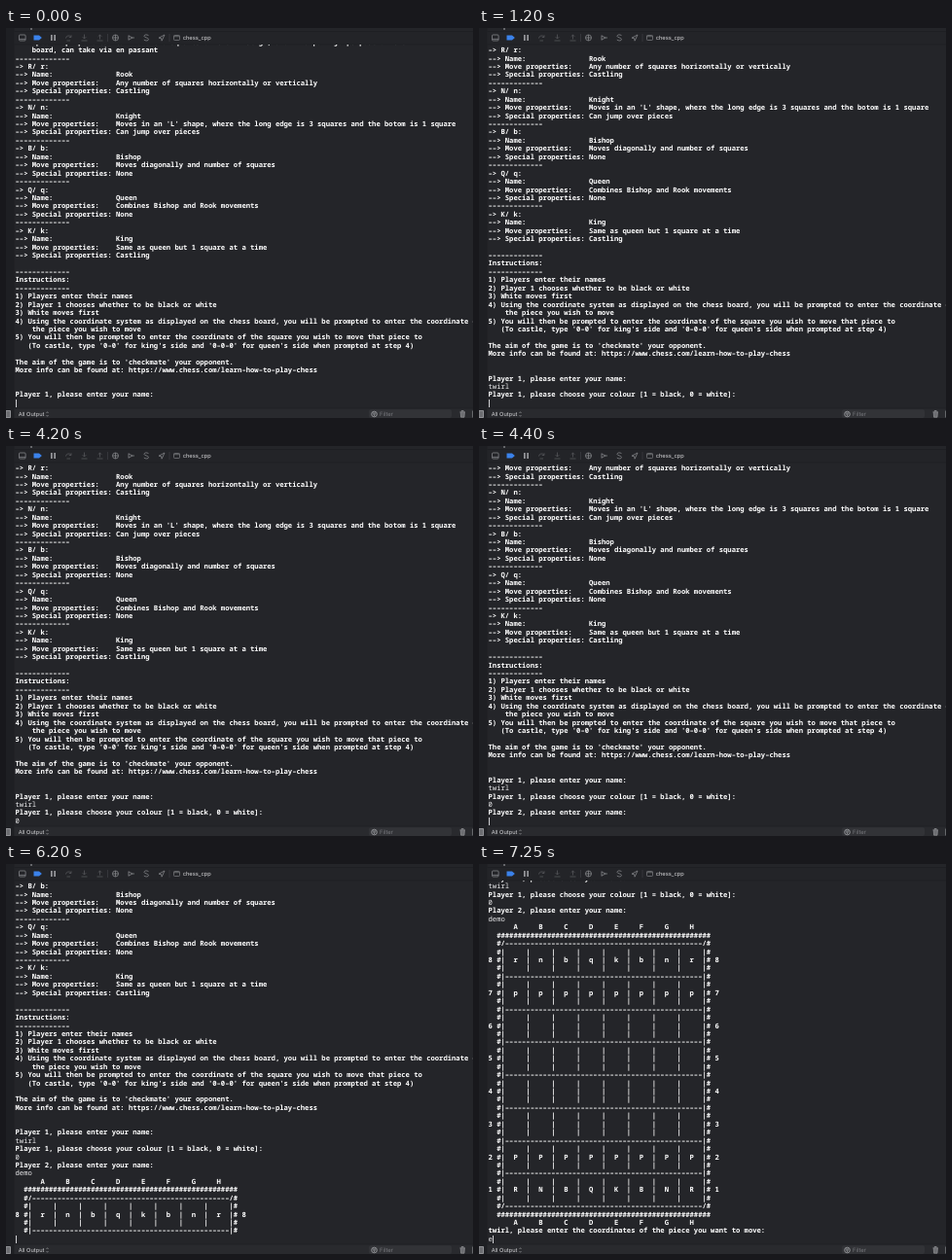
Animation of 480x401 px, one loop 8 s. Source, as an HTML page:

```html
<!DOCTYPE html>
<html lang="en">
<head>
<meta charset="utf-8">
<title>Console chess</title>
<style>
  html, body { margin: 0; width: 100%; height: 100%; overflow: hidden; background: #242529; }
  #stage { position: relative; width: 480px; height: 401px; overflow: hidden; }
  #console { position: absolute; left: 9px; top: 17px; width: 471px; height: 374px; overflow: hidden; }
  #log {
    position: absolute; left: .5px; bottom: .7px; margin: 0; color: #fff;
    font: 800 7.195px/8.44px "Noto Sans Mono", monospace;
    font-variant-ligatures: none; text-rendering: geometricPrecision; white-space: pre;
  }
  #log i { font-style: normal; font-weight: 500; color: #ececee; }
  #caret { position: absolute; bottom: 1px; width: 1px; height: 8.4px; background: #cfcfd2; }
  svg { position: absolute; left: 0; top: 0; }
  svg text { font-family: Inter, sans-serif; text-rendering: geometricPrecision; }
</style>
</head>
<body>
<div id="stage">
  <svg width="480" height="401" fill="none" stroke-width=".8">
    <path fill="#1e1f23" d="M0 0h8.5v401H0z"/>
    <path fill="#232428" d="M8.5 3.5h472V17h-472z"/>
    <path fill="#292a2e" d="M8.5 391h472v10h-472z"/>
    <path stroke="#1e1f22" d="M8.5 3.5h472M8.5 17h472M8.5 391h472"/>
    <path stroke="#77787c" d="M25 0l2 2m0-2l-2 2"/>

    <!-- debug toolbar -->
    <g stroke="#85868a">
      <rect x="13.5" y="7" width="6.6" height="6" rx="1"/>
      <path d="M14 11.4h6"/>
      <circle cx="112.5" cy="10" r="3"/>
      <path d="M112.5 7v6M109.500 10h6"/>
      <path d="M126 7.500v5M126 8l4 2-4 2M129.500 10h2.500"/>
      <path d="M146.500 7.600c-2-1.200-4.500-.8-4.500.8s4.500 1.400 4.500 3.200-3.200 1.700-4.700.5"/>
      <path d="M157 10.200l6-3.200-2.900 6.200-.5-2.600z"/>
    </g>
    <path fill="#3b82ea" d="M28.500 7.400h5.500l2.900 2.600-2.900 2.600h-5.500z"/>
    <path fill="#97989c" d="M46 7h1.700v6H46zM49.300 7h1.700v6h-1.700z"/>
    <g stroke="#55565a">
      <path d="M61.500 10.500a3 3 0 0 1 5.500-1.200m0-2v2.200h-2.200M62.500 13h3.500"/>
      <path d="M80.500 6.500v4.500m-1.800-1.800l1.800 1.800 1.800-1.800M77.500 13h6"/>
      <path d="M96.500 11.500V7m-1.800 1.800L96.500 7l1.800 1.800M93.500 13h6"/>
    </g>
    <path stroke="#3a3b40" d="M104.500 6v8M168 6v8"/>
    <rect x="172.500" y="7.500" width="6" height="5" rx=".8" stroke="#77787c"/>
    <path stroke="#77787c" d="M172.500 8.700h6"/>
    <text x="181.700" y="12.200" font-size="5.750" fill="#d9d9db">chess_cpp</text>

    <!-- bottom bar -->
    <path fill="#6c6d71" stroke="#a5a6aa" d="M0 393.500h4.500v7H0z"/>
    <text x="12.800" y="399.200" font-size="5.700" fill="#d2d2d5">All Output</text>
    <path stroke="#a0a1a5" stroke-width=".6" d="M41.500 396l1-1.300 1 1.300M41.500 398l1 1.300 1-1.300"/>
    <rect x="373" y="392.300" width="85" height="8.700" rx="2" fill="#323337"/>
    <circle cx="378.500" cy="397" r="2.800" stroke="#a5a6aa"/>
    <path stroke="#a5a6aa" d="M376.800 396h3.400M377.400 397.200h2.200M378 398.400h1"/>
    <text x="384" y="399.200" font-size="5.900" fill="#77787d">Filter</text>
    <path fill="#6c6d71" stroke="#8b8c90" d="M466.500 394.800h5.500M468.200 394.500v-1h2v1M467.200 395l.4 5.200h3.400l.4-5.200"/>
    <path stroke="#8b8c90" d="M479.700 393.500v7"/>
  </svg>
  <div id="console"><pre id="log"></pre><div id="caret"></div></div>
</div>
<script>
const LOOP = 8000, CHAR = 4.317;
const playerOne = "twirl", playerTwo = "demo";
const rule = "-".repeat(13);

const piece = (key, name, moves, special) => [
  `-> ${key}/ ${key.toLowerCase()}:`,
  `--> Name:               ${name}`,
  `--> Move properties:    ${moves}`,
  `--> Special properties: ${special}`,
];

const intro = [
  "--> Special properties: Can move two squares on the first go, and if a pawn jumps past on the",
  "    board, can take via en passant", rule,
  ...piece("R", "Rook", "Any number of squares horizontally or vertically", "Castling"), rule,
  ...piece("N", "Knight", "Moves in an 'L' shape, where the long edge is 3 squares and the botom is 1 square", "Can jump over pieces"), rule,
  ...piece("B", "Bishop", "Moves diagonally and number of squares", "None"), rule,
  ...piece("Q", "Queen", "Combines Bishop and Rook movements", "None"), rule,
  ...piece("K", "King", "Same as queen but 1 square at a time", "Castling"),
  "", rule, "Instructions:", rule,
  "1) Players enter their names",
  "2) Player 1 chooses whether to be black or white",
  "3) White moves first",
  "4) Using the coordinate system as displayed on the chess board, you will be prompted to enter the coordinate of",
  "    the piece you wish to move",
  "5) You will then be prompted to enter the coordinate of the square you wish to move that piece to",
  "   (To castle, type '0-0' for king's side and '0-0-0' for queen's side when prompted at step 4)",
  "",
  "The aim of the game is to 'checkmate' your opponent.",
  "More info can be found at: https://www.chess.com/learn-how-to-play-chess",
  "", "",
  "Player 1, please enter your name:",
];

function drawBoard() {
  const cells = row => [...row].map(c => `  ${c}  `).join("|");
  const files = "      " + [..."ABCDEFGH"].join("     ");
  const edge = "  " + "#".repeat(51);
  const line = end => `  #${end}${"-".repeat(47)}${end}#`;
  const gap = `  #|${cells(" ".repeat(8))}|#`;
  const ranks = ["rnbqkbnr", "pppppppp", ...Array(4).fill(" ".repeat(8)), "PPPPPPPP", "RNBQKBNR"];
  const rows = ranks.flatMap((row, i) =>
    [gap, `${8 - i} #|${cells(row)}|# ${8 - i}`, gap, line(i < 7 ? "|" : "/")]);
  return [files, edge, line("/"), ...rows, edge, files];
}

// the console font has wide hyphens, which an en dash resembles
const wideDashes = text => text.replaceAll("-", "\u2013");
const typed = text => `<i>${text}</i>`;
const lines = [
  ...intro,
  typed(playerOne), "Player 1, please choose your colour [1 = black, 0 = white]:",
  typed("0"), "Player 2, please enter your name:",
  typed(playerTwo), ...drawBoard(),
  `${playerOne}, please enter the coordinates of the piece you want to move:`,
].map(wideDashes);

// time, lines printed after the intro, current input, caret visible
const typing = (word, printed, times) =>
  times.map((t, i) => [t, printed, word.slice(0, i + 1), true]);
const all = lines.length - intro.length;
const steps = [
  [0, 0, "", true], [100, 0, "", false],
  ...typing(playerOne, 0, [550, 700, 850, 900, 1050]),
  [1200, 2, "", true], [1850, 2, "", false], [2400, 2, "", true],
  [2850, 2, "1", true], [3200, 2, "", true], [3650, 2, "0", true], [4200, 2, "0", false],
  [4400, 4, "", true], [4950, 4, "", false], [5500, 4, "", true],
  ...typing(playerTwo, 4, [5600, 5750, 5900, 6000]),
  [6150, 8, "", true], [6200, 12, "", true],
  [6250, all, "", true], [6800, all, "", false], [7250, all, "e", true],
];

const log = document.getElementById("log");
const caret = document.getElementById("caret");
let shown;

function render(now) {
  const t = now % LOOP;
  const step = steps.findLast(s => s[0] <= t);
  if (step !== shown) {
    shown = step;
    const [, printed, input, on] = step;
    // the trailing space keeps an empty input row open
    log.innerHTML = [...lines.slice(0, intro.length + printed), typed(input + " ")].join("\n");
    caret.style.left = .7 + CHAR * input.length + "px";
    caret.style.visibility = on ? "visible" : "hidden";
  }
}

const start = performance.now();
function tick() {
  render(performance.now() - start);
  requestAnimationFrame(tick);
}
tick();
</script>
</body>
</html>
```
